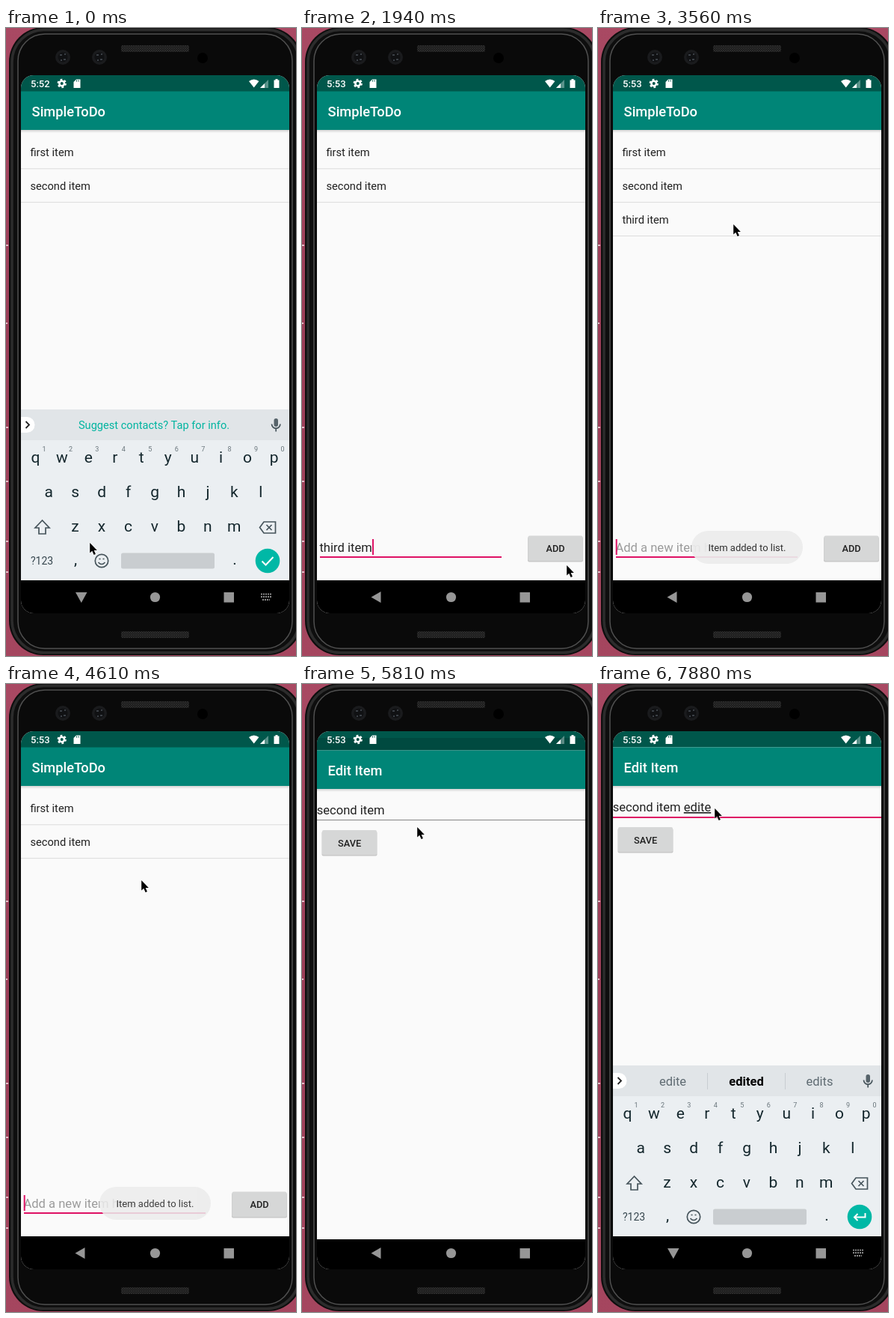
These frames come from a looping animation (388x838 px, 8000 ms). An HTML page:

```html
<!DOCTYPE html>
<html lang="en">
<head>
<meta charset="utf-8">
<title>To-do app demo</title>
<style>
  html, body { margin: 0; width: 100%; height: 100%; overflow: hidden; background: #9c4059; }
  svg { display: block; }
  text { font-family: Roboto, sans-serif; fill: #212121; white-space: pre; }
  .title { font-size: 18.3px; font-weight: 500; fill: #fff; }
  .row { font-size: 14.7px; }
  .field { font-size: 16.6px; }
  .button { font-size: 12.8px; font-weight: 500; }
  .mid { text-anchor: middle; }
  .key { font-size: 21px; fill: #14272d; }
  .digit { font-size: 9px; fill: #69757b; }
  .small { font-size: 14px; fill: #37474f; }
  .word { font-size: 16.5px; fill: #5f6b72; }
  .best { font-weight: 700; fill: #000; }
  .line { fill: none; stroke: #46545b; stroke-width: 1.7; }
  .accent { fill: #de1164; }
  .typed { text-decoration: underline; text-decoration-thickness: 1px; }
</style>
</head>
<body>
<svg width="388" height="838" viewBox="0 0 388 838">
  <defs>
    <linearGradient id="wall" x2="0" y2="1">
      <stop stop-color="#a94963"/><stop offset=".5" stop-color="#9a3d57"/><stop offset="1" stop-color="#a5465f"/>
    </linearGradient>
    <linearGradient id="shade" x2="0" y2="1">
      <stop stop-opacity=".16"/><stop offset="1" stop-opacity="0"/>
    </linearGradient>
    <pattern id="mesh" width="3" height="3" patternUnits="userSpaceOnUse">
      <rect width="3" height="3" fill="#191919"/><path d="M0 0 3 3M3 0 0 3" stroke="#323232" stroke-width=".7"/>
    </pattern>
    <clipPath id="screen"><rect x="20" y="63" width="359" height="718" rx="17"/></clipPath>
    <clipPath id="aboveNav"><path d="M20 63H379V737H20z"/></clipPath>
    <g id="lens"><circle r="10" fill="#1a1b1d"/><circle r="6.5" fill="#101113"/><path d="M-4-3h3M1 3h3M-3 4h2M2-4h2" stroke="#3b4046" stroke-width="2"/></g>
  </defs>

  <!-- wall and phone body -->
  <rect width="388" height="838" fill="url(#wall)"/>
  <path d="M0 290h3M0 394h2M0 533h3M0 605h3M0 685h3M0 726h3" stroke="#e2bcc6" stroke-width="2"/>
  <rect x="4" y="-1" width="392" height="838" rx="46" fill="#0e0e0e"/>
  <rect x="8" y="2.5" width="384" height="831" rx="43" fill="none" stroke="#2c2c2c" stroke-width="3.5"/>
  <rect x="16" y="8" width="367" height="820" rx="36" fill="#0a0a0a" stroke="#505050" stroke-width="1.5"/>
  <rect x="154" y="23" width="91" height="9" rx="2" fill="url(#mesh)"/>
  <rect x="154" y="805" width="91" height="9" rx="2" fill="url(#mesh)"/>
  <use href="#lens" x="76" y="39"/><use href="#lens" x="125" y="39"/>
  <circle cx="263" cy="40" r="7"/>

  <g clip-path="url(#screen)">
    <path d="M20 63H379V781H20z" fill="#fafafa"/>
    <path d="M20 63H379V85H20z" fill="#00574b"/>

    <!-- list screen -->
    <path d="M20 84.5H379V136H20z" fill="#008577"/>
    <path d="M20 136H379V140H20z" fill="url(#shade)"/>
    <text class="title" x="34.6" y="118">SimpleToDo</text>
    <rect id="press" x="20" width="359" height="44" fill="#d9d9d9"/>
    <path d="M20 187.8H379M20 232.6H379" stroke="#dcdcdc"/>
    <text class="row" x="32.4" y="171">first item</text>
    <text class="row" x="32.4" y="216">second item</text>
    <g id="third">
      <text class="row" x="32.4" y="261">third item</text>
      <path d="M20 277.5H379" stroke="#dcdcdc"/>
    </g>
    <text id="entry" class="field" x="23.4" y="698.5"></text>
    <path class="accent" d="M24 705H267V707H24z"/>
    <rect id="caret" class="accent" y="682" width="2" height="21"/>
    <rect x="302" y="679" width="74" height="33.5" rx="2" fill="#000" opacity=".2"/>
    <rect id="add" x="302.5" y="677.5" width="73" height="33.5" rx="2"/>
    <text class="button mid" x="339" y="698.5">ADD</text>
    <g id="toast">
      <rect x="125" y="671" width="149" height="44" rx="22" fill="#ececec"/>
      <text class="mid" x="199.5" y="698" font-size="13">Item added to list.</text>
    </g>

    <!-- navigation bar -->
    <path d="M20 737H379V781H20z"/>
    <g fill="#969696">
      <path id="back"/>
      <circle cx="199.5" cy="759.5" r="6.6"/>
      <path d="M291.5 753h13.5v13.5h-13.5z"/>
      <path id="imeIcon" d="M341 755.5h14M341 759h14M343 763h10" stroke="#8c8c8c" stroke-width="2" stroke-dasharray="2 1"/>
    </g>

    <!-- edit screen -->
    <g id="edit">
      <path id="dim" d="M20 68H379V85H20z" fill="#004a40"/>
      <path d="M20 84.5H379V737H20z" fill="#fafafa"/>
      <path d="M20 84.5H379V136H20z" fill="#008577"/>
      <path d="M20 136H379V140H20z" fill="url(#shade)"/>
      <text class="title" x="34.6" y="118">Edit Item</text>
      <text id="editText" class="field" x="19.7" y="170">second item<tspan id="gap"> </tspan><tspan id="typed" class="typed"></tspan></text>
      <rect id="editLine" x="20" y="177" width="359"/>
      <rect id="editCaret" class="accent" y="152" width="2" height="23"/>
      <path id="handle" d="M112 177l6.4 4.2a9 9 0 1 1-12.8 0z" fill="#f76fa3"/>
      <rect x="26.5" y="192.5" width="74" height="33" rx="2" fill="#000" opacity=".2"/>
      <rect x="27" y="191" width="73" height="33" rx="2" fill="#d6d7d7"/>
      <text class="button mid" x="63.7" y="212.5">SAVE</text>
    </g>

    <g clip-path="url(#aboveNav)"><g id="keyboard">
      <path d="M20 509H379V738H20z" fill="#ebeff2"/>
      <path d="M20 509H379V550H20z" fill="#e1e5e8"/>
      <path d="M20 519h8a10.5 10.5 0 0 1 0 21h-8z" fill="#fff"/>
      <path d="M26.5 525l4.5 4.5-4.5 4.5" fill="none" stroke="#222" stroke-width="1.8"/>
      <text id="tip" class="mid" x="198" y="535" font-size="14.6" style="fill:#00b4a0">Suggest contacts? Tap for info.</text>
      <g id="words">
        <path d="M146.5 519V541M250.5 519V541" stroke="#c8cdd1"/>
        <text class="word mid" x="100" y="536"></text>
        <text class="word best mid" x="198.5" y="536"></text>
        <text class="word mid" x="296.5" y="536"></text>
      </g>
      <rect x="358.5" y="521" width="5.5" height="11" rx="2.7" fill="#56636a"/>
      <path class="line" d="M355.5 528.5a5.7 5.7 0 0 0 11.4 0M361.2 534.5v4"/>
      <g id="keys"></g>
      <path class="line" d="M48.5 657l-9.5 10h5v8h9v-8h5z"/>
      <path class="line" d="M345 659h15.5v15H345l-5.5-7.5zM348.5 663l7 7M355.5 663l-7 7"/>
      <text class="small" x="33" y="716">?123</text>
      <text class="key mid" x="93" y="716">,</text>
      <text class="key mid" x="306" y="716">.</text>
      <circle class="line" cx="128" cy="711" r="8.7"/>
      <path class="line" d="M123.5 713q4.5 5 9 0M124.5 708.5h2M129.5 708.5h2"/>
      <rect x="154" y="700.5" width="125" height="21" rx="2.5" fill="#c9cdd0"/>
      <circle cx="350" cy="711" r="16.3" fill="#00b8a6"/>
      <path id="enter" fill="none" stroke="#fff" stroke-width="2"/>
    </g></g>

    <!-- status bar -->
    <text id="clock" x="33" y="79" style="font-size:13px;font-weight:500;fill:#fff"></text>
    <circle cx="74.7" cy="74" r="3.3" fill="none" stroke="#fff" stroke-width="2.6"/>
    <circle cx="74.7" cy="74" r="5.2" fill="none" stroke="#fff" stroke-width="2" stroke-dasharray="2.72"/>
    <path d="M94 68.5h5.5v11.5h-9V72z" fill="#fff"/>
    <path d="M94.5 69.5v2M97 69.5v2" stroke="#00574b"/>
    <path d="M325 71q6.7-5 13.4 0l-6.7 8.5z" fill="#fff"/>
    <path d="M351 69v11h-11z" fill="#fff" opacity=".35"/>
    <path d="M346 74v6h-6z" fill="#fff"/>
    <path d="M358.5 69.5h2v-1.5h3v1.5h2V80h-7z" fill="#fff"/>
  </g>
  <g id="mouse">
    <path transform="translate(-.8 0) scale(.93)" d="M0 0V14.5l3.3-3 2.5 5.7 2.5-1.1-2.4-5.4h4.5z" stroke="#fff" stroke-width="1.2" paint-order="stroke"/>
  </g>
</svg>

<script>
const TICK = 148.3, LOOP = 8000, KEYBOARD_HEIGHT = 229;
const $ = id => document.getElementById(id);
const show = (id, on) => $(id).style.display = on ? '' : 'none';
const set = (id, attrs) => { for (const k in attrs) $(id).setAttribute(k, attrs[k]); };
const shift = (id, x, y) => set(id, { transform: `translate(${x} ${y})` });

// Keys of the form [tick, value, ...], joined by straight lines
function track(keys, n) {
  const i = keys.findIndex(k => k[0] > n);
  if (i < 0) return keys.at(-1).slice(1);
  if (!i) return keys[0].slice(1);
  const [a, b] = [keys[i - 1], keys[i]];
  const p = (n - a[0]) / (b[0] - a[0]);
  return a.slice(1).map((v, j) => v + (b[j + 1] - v) * p);
}

const mousePath = [
  [7, 113, 687], [9, 330, 706], [10, 350, 712], [12, 355, 717], [13, 355, 717],
  [15, 350, 709], [16, 346, 703], [18, 346, 703], [22, 184, 292], [23, 181, 272],
  [24, 182, 262], [31, 182, 262], [34, 155, 203], [38, 155, 203], [39, 155, 191], [41, 157, 166]
];
const toastFade = [[16, 0], [19, .92], [30, .92], [31, .85], [34, 0]];
const keyboardDrop = [[10, 0], [13, KEYBOARD_HEIGHT], [42, KEYBOARD_HEIGHT], [45, 0]];
const editSlide = [[38, 16], [39, 4], [40, 0]];

const addWords = ['i I in', 'it it is', 'ite item iteration', 'item item items'];
const editWords = ['e email even', 'ed edit education', 'edi edit edition', 'edit edited editing', 'edite edited edits'];

const keyRow = (letters, x, y, digits = '') => [...letters].map((c, i) => {
  const kx = x + i * 35.45;
  const digit = digits && `<text class="digit mid" x="${kx + 11.5}" y="565">${digits[i]}</text>`;
  return `<text class="key mid" x="${kx}" y="${y}">${c}</text>${digit}`;
}).join('');
$('keys').innerHTML = keyRow('qwertyuiop', 39.5, 580, '1234567890')
  + keyRow('asdfghjkl', 57.3, 626) + keyRow('zxcvbnm', 92.5, 672);

function drawList(n) {
  const added = n >= 17;
  $('entry').textContent = added ? 'Add a new item here...' : 'third item';
  $('entry').style.fill = added ? '#9b9b9b' : '';
  show('caret', (n * TICK + 460) % 1000 < 500);
  set('caret', { x: added ? 23.7 : 23.6 + $('entry').getComputedTextLength() });
  set('add', { fill: n === 16 || n === 17 ? '#bfc0c0' : '#d6d7d7' });
  show('third', added && n < 29);
  show('press', (n >= 26 && n < 29) || n === 37);
  set('press', { y: n < 30 ? 233 : 188 });
  set('toast', { opacity: track(toastFade, n)[0] });
}

function drawEdit(n) {
  show('edit', n >= 38);
  if (n < 38) return;
  const typed = ' edite'.slice(0, Math.max(0, n - 44));
  const focused = n >= 42;
  const [y] = track(editSlide, n);
  shift('edit', 0, y);
  show('dim', y > 0);
  $('gap').textContent = typed.slice(0, 1);
  $('typed').textContent = typed.slice(1);
  set('editLine', { height: focused ? 2 : 1, fill: focused ? '#de1164' : '#858585' });
  show('editCaret', focused && n < 53);
  set('editCaret', { x: 20.5 + $('editText').getComputedTextLength() });
  show('handle', focused && n < 47);
}

function drawKeyboard(n) {
  const [drop] = track(keyboardDrop, n);
  const open = drop < KEYBOARD_HEIGHT;
  const onEdit = n > 30;
  show('keyboard', open);
  shift('keyboard', 0, drop);
  show('imeIcon', open);
  set('back', { d: open ? 'M93 753h15.5l-7.7 14z' : 'M105.5 752v15l-13-7.5z' });
  set('enter', { d: onEdit ? 'M357.5 706v5.5h-14M347.5 707l-4.5 4.5 4.5 4.5' : 'M342.5 711.5l5 5 10-10.5' });

  const words = onEdit ? editWords[Math.min(n - 46, 4)] : addWords[Math.min(n - 3, 3)];
  show('tip', !words);
  show('words', words);
  if (words) words.split(' ').forEach((w, i) => $('words').children[i + 1].textContent = w);
}

function frame() {
  const n = Math.floor(performance.now() % LOOP / TICK);
  $('clock').textContent = n < 2 ? '5:52' : '5:53';
  drawList(n);
  drawEdit(n);
  drawKeyboard(n);
  shift('mouse', ...track(mousePath, n));
  requestAnimationFrame(frame);
}
frame();
</script>
</body>
</html>
```
